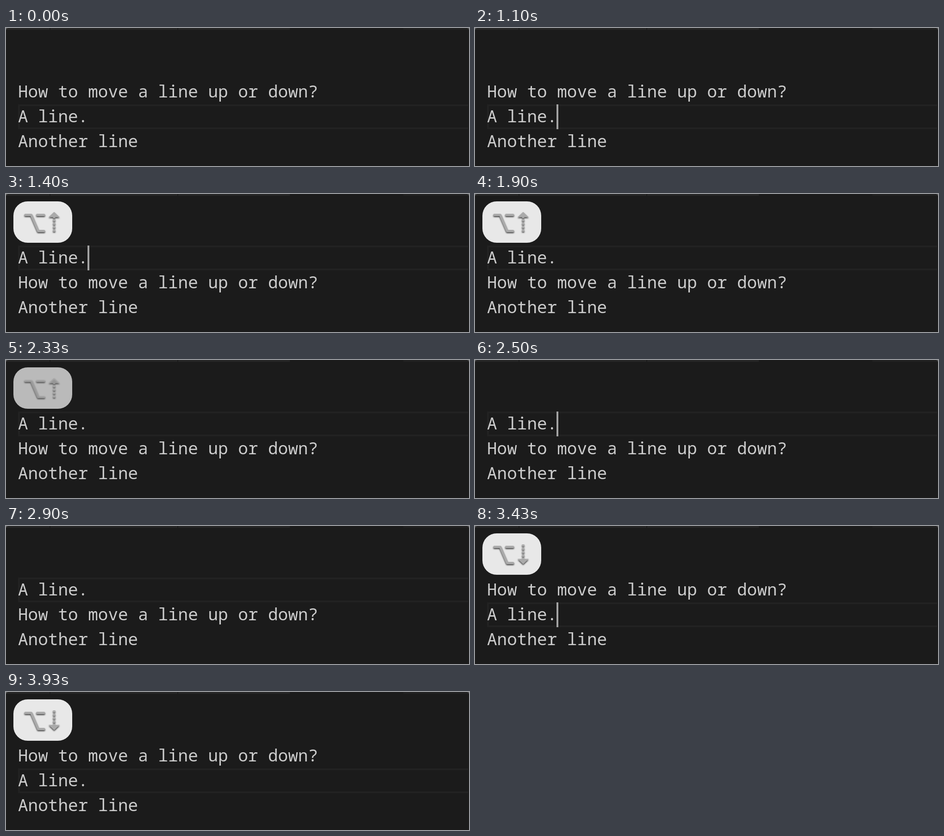
An HTML page for the animation above (4260 ms loop, 1000x300 px).

```html
<!DOCTYPE html>
<html lang="en">
<head>
<meta charset="utf-8">
<title>Move a line up or down</title>
<style>
  html, body { margin: 0; height: 100%; overflow: hidden; background: #1b1b1b; }
  svg { display: block; width: 1000px; height: 300px; }
  text { font: 36px "Noto Sans Mono", monospace; fill: #ccc; white-space: pre; }
  #symbols { filter: drop-shadow(0.5px 2px 1.5px rgba(0, 0, 0, .75)); }
</style>
</head>
<body>
<svg viewBox="0 0 1000 300">
  <!-- bottom edge of the tab strip -->
  <path fill="#262626" d="M0 0H94V4H0zM96 0H370V4H96zM372 0H613V4H372z"/>
  <path fill="#212121" d="M858 0H1000V4H858z"/>
  <path fill="#555" d="M0 0H4Q1 1 0 4zM1000 0H996Q999 1 1000 4z"/>

  <g id="current">
    <path d="M998 168H28V218H998" fill="none" stroke="#222" stroke-width="4"/>
    <text x="26" y="204.5">A line.</text>
    <rect id="cursor" x="176" y="166" width="4" height="54" fill="#a3a3a3"/>
  </g>
  <text id="question" x="26" y="150.5">How to move a line up or down?</text>
  <text x="26" y="258.5">Another line</text>

  <g id="key">
    <rect id="cap" x="16" y="16" width="127" height="90" rx="31" fill="#e8e8e8"/>
    <g id="symbols">
      <path d="M42 45.5H54.5L69.5 80.5H82M67.5 45.5H82" fill="none" stroke="currentColor"
            stroke-width="5" stroke-linecap="round" stroke-linejoin="round"/>
      <path id="arrow" fill="currentColor"
            d="M104 39L116 50.5H106.5V52.5H101.5V50.5H92zM101.5 55h5v4.5h-5zM101.5 62.5h5v4.5h-5zM101.5 70h5v4.5h-5zM101.5 77.5h5v4.5h-5z"/>
    </g>
  </g>
</svg>
<script>
  const LOOP = 4260, MOVE_UP = 1400, MOVE_DOWN = 3430, ROW = 54;
  const cursorOn = [[100, 600], [1100, 1900], [2400, 2900], [3430, 3930]];
  const fadeSteps = [2330, 2370, 2400, 2430, 2470, 2500];
  const el = id => document.getElementById(id);
  const show = (id, visible) => el(id).setAttribute("visibility", visible ? "visible" : "hidden");
  const shift = (id, y) => el(id).setAttribute("transform", `translate(0 ${y})`);

  function keyOpacity(t) {
    if (t < MOVE_UP) return 0;
    if (t >= MOVE_DOWN) return 1;
    const step = fadeSteps.filter(s => t >= s).length;
    return step ? Math.max(0, 0.95 - 0.173 * step) : 1;
  }

  function render(t) {
    const movedUp = t >= MOVE_UP && t < MOVE_DOWN;
    shift("current", movedUp ? -ROW : 0);
    shift("question", movedUp ? ROW : 0);
    show("cursor", cursorOn.some(([from, to]) => t >= from && t < to));

    // Cap and symbols fade separately, so the symbols end up lighter than the cap.
    const opacity = keyOpacity(t);
    show("key", opacity > 0);
    el("cap").setAttribute("fill-opacity", opacity);
    el("symbols").style.color = `rgba(170, 170, 170, ${opacity})`;
    el("arrow").setAttribute("transform", t >= MOVE_DOWN ? "matrix(1 0 0 -1 0 122)" : "");
  }

  function frame() {
    render(performance.now() % LOOP);
    requestAnimationFrame(frame);
  }
  frame();
</script>
</body>
</html>
```
